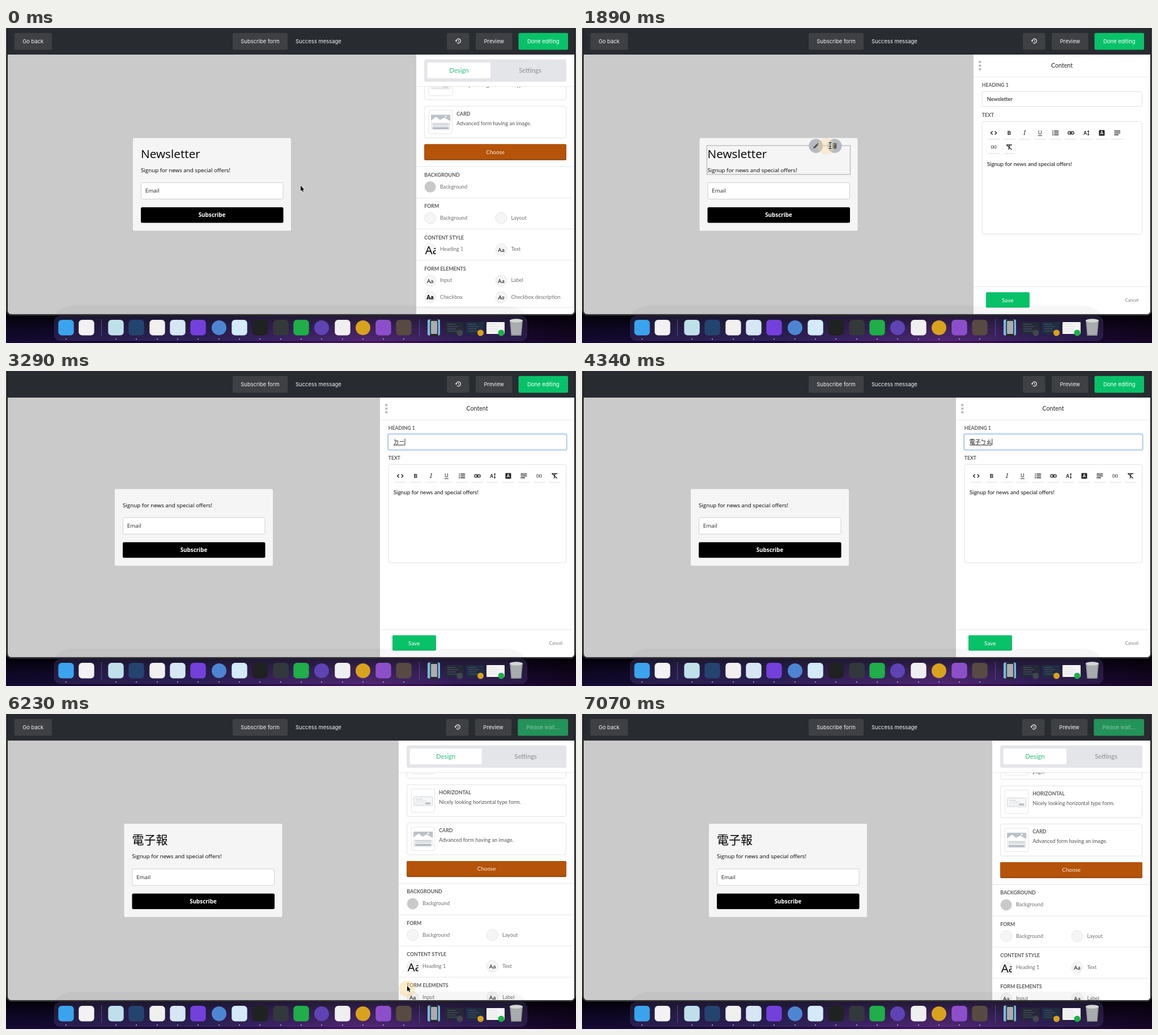
Write an HTML page with a canvas that moves like this. It is 1006 px wide and 557 px high and loops after 7.35 s.

```html
<!DOCTYPE html>
<html lang="en">
<head>
<meta charset="utf-8">
<title>Form editor</title>
<style>
html, body { margin: 0; width: 100%; height: 100%; overflow: hidden; background: #120622; }
canvas { display: block; width: 1006px; height: 557px; }
</style>
</head>
<body>
<canvas id="stage"></canvas>
<script>
const W = 1006, H = 557, LOOP = 7350;
const canvas = document.getElementById('stage');
const dpr = window.devicePixelRatio || 1;
canvas.width = W * dpr;
canvas.height = H * dpr;
const c = canvas.getContext('2d');

const LATO = 'Lato, sans-serif';
const INTER = 'Inter, sans-serif';
const OPEN = '"Open Sans", sans-serif';
const CJK = '"Noto Sans CJK TC", "Noto Sans CJK", sans-serif';
const GREEN = '#08c269';

// Panel swaps: edit panel slides in, design panel slides back
const OPEN_AT = 1747, CLOSE_AT = 6087, SLIDE = 280;

const clamp = v => Math.max(0, Math.min(1, v));
const ease = v => { v = clamp(v); return v * v * (3 - 2 * v); };
const during = (t, a, b) => t >= a && t < b;

function box(x, y, w, h, r, fill, stroke, lw = 1) {
  c.beginPath();
  c.roundRect(x, y, w, h, r);
  if (fill) { c.fillStyle = fill; c.fill(); }
  if (stroke) { c.strokeStyle = stroke; c.lineWidth = lw; c.stroke(); }
}
function disc(x, y, r, fill, stroke) {
  c.beginPath();
  c.arc(x, y, r, 0, 7);
  if (fill) { c.fillStyle = fill; c.fill(); }
  if (stroke) { c.strokeStyle = stroke; c.lineWidth = 1; c.stroke(); }
}
function line(pts, color, lw = 1) {
  c.beginPath();
  for (let i = 0; i < pts.length; i += 2) c.lineTo(pts[i], pts[i + 1]);
  c.strokeStyle = color;
  c.lineWidth = lw;
  c.stroke();
}
function poly(pts, fill, stroke, lw = 1) {
  c.beginPath();
  for (let i = 0; i < pts.length; i += 2) c.lineTo(pts[i], pts[i + 1]);
  c.closePath();
  if (stroke) { c.strokeStyle = stroke; c.lineWidth = lw; c.lineJoin = 'round'; c.stroke(); }
  c.fillStyle = fill;
  c.fill();
}
// y is the middle of the capitals
function text(s, x, y, size, color, font = LATO, style = '', align = 'left') {
  c.font = `${style} ${size}px ${font}`;
  c.textAlign = align;
  c.fillStyle = color;
  c.fillText(s, x, y + size * 0.355);
}
const mid = (s, x, y, size, color, font, style) => text(s, x, y, size, color, font, style, 'center');

function panelLeft(t) {
  return 724 - 64 * (ease((t - OPEN_AT) / SLIDE) - ease((t - CLOSE_AT) / SLIDE));
}

function desktop() {
  const g = c.createLinearGradient(0, 0, W, 0);
  g.addColorStop(0, '#140a33');
  g.addColorStop(0.35, '#1c0c42');
  g.addColorStop(0.64, '#4a1668');
  g.addColorStop(0.8, '#220b42');
  g.addColorStop(1, '#150626');
  c.fillStyle = g;
  c.fillRect(0, 0, W, H);
  // window shadow
  const s = c.createLinearGradient(0, 506, 0, H);
  s.addColorStop(0, 'rgba(0,0,0,0.85)');
  s.addColorStop(0.45, 'rgba(0,0,0,0.4)');
  s.addColorStop(1, 'rgba(0,0,0,0)');
  c.fillStyle = s;
  c.fillRect(0, 0, W, H);
  c.fillStyle = '#2c2c2b';
  c.fillRect(0, 0, 4, 500);
  c.fillRect(1002, 0, 4, 500);
}

function topBar(t) {
  c.fillStyle = '#282b30';
  c.fillRect(3, 0, 1000, 47);
  const saved = t >= CLOSE_AT;
  const btn = (x, w, label, fill = '#3e4043', color = '#f4f4f4') => {
    box(x, 8.7, w, 29.7, 2.5, fill);
    mid(label, x + w / 2, 23.5, 9.45, color, INTER);
  };
  if (t < 1960 || saved) btn(14.5, 66.5, 'Go back');
  btn(400, 97, 'Subscribe form');
  text('Success message', 511, 23.3, 9.45, '#f4f4f4', INTER);
  const d = saved ? 1.2 : 0;
  btn(778 - d, 39.5, '');
  historyIcon(798 - d, 23);
  btn(829 - d, 64.5, 'Preview');
  if (saved) btn(903.3, 88.7, 'Please wait...', '#23935a', '#86c6a4');
  else btn(904.5, 87.5, 'Done editing', GREEN, '#fff');
}
function historyIcon(x, y) {
  c.beginPath();
  c.arc(x + 0.5, y, 3.9, -3, 2.3);
  c.strokeStyle = '#f4f4f4';
  c.lineWidth = 1.2;
  c.stroke();
  poly([x - 5.5, y - 1, x - 1.5, y - 1, x - 3.5, y + 1.5], '#f4f4f4');
  line([x + 0.5, y - 2, x + 0.5, y + 0.4, x + 2.2, y + 1.3], '#f4f4f4');
}

function form(t, L) {
  const cx = (3 + L) / 2, x = cx - 139.5, ix = x + 14;
  const empty = during(t, 3150, 4620), chinese = t >= 4620;
  const h = empty ? 135.5 : chinese ? 165 : 164;
  const top = 276.5 - h / 2, b = top + h;
  box(x, top, 279, h, 2.5, '#f5f5f5');
  if (chinese) text('電子報', ix, top + 29, 21, '#000', CJK);
  else if (!empty) text('Newsletter', ix, top + 28.5, 20.8, '#000', OPEN);
  text('Signup for news and special offers!', ix, b - 107.2, 9.75, '#000', OPEN);
  box(ix + 0.5, b - 85, 250.5, 29, 2, '#fff', '#cfcfcf');
  text('Email', ix + 7.8, b - 70.8, 9.75, '#222', OPEN);
  box(ix, b - 41.6, 251.5, 27.7, 2.5, '#000');
  mid('Subscribe', cx, b - 27.6, 9.85, '#fff', OPEN, 'bold');
  if (during(t, 400, 1960)) hoverTools(x, top);
}
function hoverTools(x, top) {
  box(x + 13, top + 13.3, 253, 51, 0, null, '#b4b6b8', 1.3);
  const y = top + 14, p = x + 205.3, d = x + 238.5;
  disc(p, y, 12.5, '#b5bbc0');
  disc(d, y, 12.5, '#b5bbc0');
  poly([p - 4.5, y + 4.5, p - 4, y + 2, p + 1.5, y - 3.5, p + 3.7, y - 1.3, p - 2, y + 4], '#4a4d50');
  line([p + 2.7, y - 4.5, p + 4.6, y - 2.6], '#4a4d50', 1.5);
  box(d - 3.3, y - 2.4, 6.6, 7.4, 1, '#5a5d60');
  line([d - 4.4, y - 3.6, d + 4.4, y - 3.6], '#5a5d60', 1.3);
  line([d - 1.5, y - 4.8, d + 1.5, y - 4.8], '#5a5d60', 1.2);
}

function thumbHorizontal(x, y) {
  box(x + 4.5, y + 14, 33, 15.5, 1, '#f6f7f8', '#cdd1d5');
  line([x + 8, y + 18, x + 20, y + 18], '#c3c8cd', 1.2);
  line([x + 8, y + 21, x + 27, y + 21], '#d5d9dc', 1);
  box(x + 8, y + 24, 15, 3, 0, '#fff', '#cdd1d5', 0.7);
  box(x + 25, y + 23.7, 9, 3.6, 0.5, '#b6bcc2');
}
function thumbCard(x, y) {
  box(x + 4, y + 8, 34, 27, 1, '#eceef0');
  box(x + 4, y + 8, 34, 14, 1, '#bcc2c8');
  poly([x + 4, y + 22, x + 4, y + 18, x + 13, y + 11.5, x + 20, y + 17, x + 27, y + 13, x + 38, y + 19, x + 38, y + 22], '#fff');
  disc(x + 30, y + 11, 1.5, '#fff');
  line([x + 7, y + 24.3, x + 35, y + 24.3], '#bcc2c8', 1.3);
  line([x + 7, y + 27.5, x + 35, y + 27.5], '#cfd3d7', 1.2);
  box(x + 7, y + 30, 28, 3.2, 0.5, '#b2b9bf');
}

function designPanel(t, L) {
  const x = L + 14.2, w = 989 - x, off = t < OPEN_AT ? -56.5 : L < 712 ? -2 : 0;
  box(x, 55.5, w, 39.5, 3, '#e4e5e9');
  const tab = w / 2 - 14;
  box(x + 5.5, 61, tab, 28, 2.5, '#fff');
  mid('Design', x + 5.5 + tab / 2, 75, 11.3, '#2abf78');
  mid('Settings', 989 - w * 0.255, 75, 11.3, '#8a8c90');
  line([L, 103.5, 1002, 103.5], '#e8e8e8');

  c.save();
  c.beginPath();
  c.rect(L, 104, 1003 - L, 402);
  c.clip();
  c.translate(0, off);
  const option = (y, title, note, thumb) => {
    box(x + 0.5, y, w - 1, 56.5, 3, '#fff', '#e2e2e2');
    box(x + 8, y + 7.5, 41.5, 41.5, 3, '#fff', '#e4e4e4');
    if (thumb) thumb(x + 8, y + 7.5);
    text(title, x + 57, y + 13.7, 8.8, '#5c5c5c', LATO, 'bold');
    text(note, x + 57, y + 30.7, 9.25, '#555');
  };
  option(59, '', '');
  if (off === 0) text('page.', x + 57, 101.5, 9.25, '#555');
  option(127, 'HORIZONTAL', 'Nicely looking horizontal type form.', thumbHorizontal);
  option(194.5, 'CARD', 'Advanced form having an image.', thumbCard);
  box(x, 262, w, 28.3, 2, '#8d4207');
  box(x, 262, w, 26.6, 2, '#b45309');
  mid('Choose', x + w / 2, 276, 9.8, '#fbeee2');

  const col2 = w / 2;
  const heading = (y, s) => {
    line([L, y - 14.5, 1002, y - 14.5], '#e6e6e6');
    text(s, x, y + 0.3, 8.85, '#5a5a5a', LATO, 'bold');
  };
  const item = (dx, y, label, aa, fill = '#f5f5f5') => {
    const ix = x + 10.5 + dx;
    disc(ix, y + 0.5, 10, fill, fill === '#f5f5f5' ? '#e6e6e6' : null);
    if (aa) {
      c.save();
      c.beginPath();
      c.rect(ix - 10, y - 10, 20, 20.5);
      c.clip();
      if (aa === 'big') text('Aa', ix - 9, y + 2, 20.5, '#000', OPEN);
      else mid('Aa', ix, y + 1.3, 9.8, '#000', OPEN, aa);
      c.restore();
    }
    text(label, ix + 17.3, y, 9.2, '#707070');
  };
  heading(316, 'BACKGROUND');
  item(0, 337, 'Background', '', '#c9c9c9');
  heading(371.5, 'FORM');
  item(0, 392.3, 'Background');
  item(col2, 392.3, 'Layout');
  heading(426.7, 'CONTENT STYLE');
  item(0, 447.5, 'Heading 1', 'big');
  item(col2, 447.5, 'Text', 'normal');
  heading(481.8, 'FORM ELEMENTS');
  item(0, 502.7, 'Input', 'normal');
  item(col2, 502.7, 'Label', 'normal');
  item(0, 532, 'Checkbox', 'bold');
  item(col2, 532, 'Checkbox description', 'italic');
  line([L, 551, 1002, 551], '#e6e6e6');
  c.restore();
}

const K = '#222';
const rows = (x, y, a, b) => [-3.2, 0, 3.2].forEach((d, i) => line([x + a, y + d, x + (i === 2 ? b - 3 : b), y + d], K, 1.4));
const tools = [
  (x, y) => {
    line([x - 2, y - 3, x - 5, y, x - 2, y + 3], K, 1.4);
    line([x + 2, y - 3, x + 5, y, x + 2, y + 3], K, 1.4);
  },
  (x, y) => mid('B', x, y, 9.6, K, INTER, 'bold'),
  (x, y) => mid('I', x, y, 10, K, '"Noto Serif", serif', 'italic'),
  (x, y) => { mid('U', x, y - 0.7, 9, K, INTER); line([x - 3.6, y + 4.8, x + 3.6, y + 4.8], K); },
  (x, y) => [-3.3, 0, 3.3].forEach(d => {
    box(x - 5.5, y + d - 0.8, 1.7, 1.7, 0, K);
    line([x - 2.5, y + d, x + 5.5, y + d], K, 1.5);
  }),
  (x, y) => {
    box(x - 5.3, y - 2.4, 5.6, 4.8, 2.4, null, K, 1.2);
    box(x - 0.3, y - 2.4, 5.6, 4.8, 2.4, null, K, 1.2);
    line([x - 2.7, y, x + 2.7, y], K, 1.2);
  },
  (x, y) => {
    mid('A', x - 2, y, 8.6, K, INTER, '600');
    line([x + 3.4, y - 3.5, x + 3.4, y + 3.5], K);
    poly([x + 1.5, y - 2.3, x + 3.4, y - 4.7, x + 5.3, y - 2.3], K);
    poly([x + 1.5, y + 2.3, x + 3.4, y + 4.7, x + 5.3, y + 2.3], K);
  },
  (x, y) => { box(x - 5, y - 5, 10, 10, 1.3, K); mid('A', x, y, 8, '#fff', INTER, '600'); },
  (x, y) => rows(x, y, -5.3, 5.3),
  (x, y) => mid('{x}', x, y, 7.6, K, INTER, '500'),
  (x, y) => {
    line([x - 4, y - 4, x + 5, y - 4], K, 1.4);
    line([x + 1, y - 4, x - 1, y + 4.5], K, 1.4);
    line([x - 5, y - 4.5, x + 4.5, y + 4.5], K, 1.2);
  }
];

// Phonetic typing in the heading field: [from ms, text]
const typed = [
  [0, 'Newsletter'], [3150, ''], [3220, 'ㄉ'], [3290, 'ㄉㄧ'], [3640, 'ㄉㄧㄢ'], [3710, '電'],
  [3850, '電ㄗ'], [3920, '電子'], [4200, '電子ㄅ'], [4270, '電子ㄅㄠ'], [4480, '電子報']
];

function contentPanel(t, L) {
  const x = L + 14.5, w = 989 - x, cx = (L + 1003) / 2;
  [60, 66.5, 73].forEach(y => disc(L + 11.3, y, 2.3, '#bdbdbd'));
  mid('Content', cx, 66.3, 10.7, '#222');
  line([L, 86.5, 1002, 86.5], '#e8e8e8');
  text('HEADING 1', x + 0.3, 101.3, 8.7, '#5c5c5c', LATO, 'bold');

  if (t >= 2870) box(x - 0.3, 111.3, w + 0.9, 28.4, 2.5, '#fff', '#b3cdf8', 2.2);
  else box(x + 0.5, 112.5, w - 1, 26, 2, '#fff', '#e0e0e0');
  const value = typed.filter(k => k[0] <= t).pop()[1];
  const latin = t < 3150;
  const size = latin ? 9.4 : 9.9;
  c.font = `${size}px ${latin ? LATO : CJK}`;
  const tw = c.measureText(value).width;
  if (during(t, 2870, 3150)) box(x + 9.3, 118, tw, 14, 0, '#b4d5fe');
  text(value, x + 9.3, 125.5, size, '#111', latin ? LATO : CJK);
  if (during(t, 3150, 4620)) {
    if (tw) line([x + 9.3, 131, x + 9.3 + tw, 131], '#222', 1);
    line([x + 9.8 + tw, 119.5, x + 9.8 + tw, 131], '#222', 0.9);
  }

  text('TEXT', x + 0.3, 153.8, 8.7, '#5c5c5c', LATO, 'bold');
  const perRow = Math.min(11, Math.floor((w - 15) / 27.2));
  const wrapped = perRow < 11;
  box(x + 0.5, 165.5, w - 1, wrapped ? 199 : 173.5, 2, '#fff', '#e2e2e2');
  tools.forEach((icon, i) => {
    const bx = x + 21.2 + (i % perRow) * 27.25, by = 185.5 + Math.floor(i / perRow) * 25.2;
    box(bx - 11, by - 10.5, 22, 22.2, 2, '#dcdcdc');
    box(bx - 11.5, by - 11.5, 23, 22.3, 2, '#fff');
    icon(bx, by);
  });
  text('Signup for news and special offers!', x + 9.3, wrapped ? 240.2 : 214.8, 9.9, '#111');

  line([L, 457.5, 1002, 457.5], '#e8e8e8');
  box(L + 22, 467.3, 77, 27.2, 2, t >= 5600 ? '#1faa66' : GREEN);
  mid('Save', L + 60.3, 481, 10, '#fff');
  text('Cancel', 958.5, 481, 7.95, '#777');
}

const apps = [
  [106, '#3ba3ee'], [142, '#f3f1f1'], [194, '#bfe0ea'], [230, '#23446f'], [267, '#f0f0ef'],
  [303, '#d6e6f4'], [339, '#7440dc'], [376, '#4c86d2', 1], [412, '#d3eaf8'], [448, '#1f2221'],
  [485, '#33383b'], [521, '#1fae48'], [557, '#5f43b4', 1], [594, '#efefef'], [630, '#d9a21c', 1],
  [666, '#8c4fc9'], [702, '#584a41']
];
// soft edge of the dock reaching over the window
function dockEdge() {
  box(78, 491, 847, 40, [40, 40, 0, 0], 'rgba(0,0,0,0.035)');
}
function dock() {
  box(85.5, 509.5, 834, 43, 10, 'rgba(120,110,190,0.2)', 'rgba(170,150,220,0.18)', 0.8);
  line([168.5, 515, 168.5, 546], '#57488a');
  line([729.5, 515, 729.5, 546], '#57488a');
  apps.forEach(([x, color, round]) => {
    if (round) disc(x, 530, 13, color);
    else box(x - 13.7, 516, 27.4, 27.6, 6, color);
    if (x !== 142) disc(x, 550, 1.1, '#b9b0d0');
  });
  box(744, 515.5, 22, 28, 2, '#79b9dc');
  box(748.5, 515, 14, 30, 2.5, '#23272c');
  box(750, 518, 11, 23, 1, '#a9adb0');
  const mini = (x, fill, badge) => {
    const pale = fill === '#f5f6f5';
    box(x - 16, 520, 32, 21, 1, fill);
    for (let i = 0; i < 4; i++) {
      line([x - 12, 524 + i * 4, x + 2 + (i * 5) % 9, 524 + i * 4], pale ? '#d5dad6' : '#59606e', 0.9);
    }
    disc(x + 10, 539, 5.5, badge);
  };
  mini(791, '#252a36', '#42464d');
  mini(827.5, '#1f2d42', '#d9a21c');
  mini(864, '#f5f6f5', '#1fae48');
  poly([889, 517, 912, 517, 909.5, 544, 891.5, 544], '#8f9395');
  poly([891, 520, 910, 520, 908.5, 542, 892.5, 542], '#a9acad');
  c.beginPath();
  c.ellipse(900.5, 517.5, 11.7, 3.3, 0, 0, 7);
  c.fillStyle = '#d4d6d6';
  c.fill();
}

// Pointer path: [ms, x, y, shape from here on]
const path = [
  [0, 520, 283, 'arrow'], [70, 520, 283, 'arrow'], [420, 420, 250, 'beam'], [770, 358, 236, 'beam'],
  [980, 414, 241, 'beam'], [1120, 414, 241, 'beam'], [1450, 429, 208, 'hand'], [1750, 431, 208, 'beam'],
  [1890, 438, 208, 'beam'], [2000, 490, 195, 'arrow'], [2480, 735, 130, 'beam'], [2660, 763, 127, 'beam'],
  [3150, 763, 127, ''], [5110, 763, 127, 'beam'], [5320, 752, 240, 'beam'], [5460, 745, 290, 'arrow'],
  [5600, 708, 478, 'hand'], [5670, 699, 491, 'hand'], [5880, 706, 487, 'hand'], [6090, 708, 485, 'arrow'],
  [6440, 708, 485, 'arrow'], [6860, 690, -20, ''], [LOOP, 690, -20, '']
];
function click(t, start, x, y) {
  const a = clamp((t - start) / 70) * clamp((start + 420 - t) / 100);
  if (a > 0) disc(x, y, 14.5, `rgba(252,214,140,${0.45 * a})`);
}
function pointer(t) {
  click(t, 1540, 431, 209);
  click(t, 2720, 763, 127);
  click(t, 5950, 708, 486);
  const i = path.findIndex(k => k[0] > t) - 1;
  const [t0, x0, y0, shape] = path[i], [t1, x1, y1] = path[i + 1];
  if (!shape) return;
  const p = (t - t0) / (t1 - t0);
  c.save();
  c.translate(x0 + (x1 - x0) * p, y0 + (y1 - y0) * p);
  if (shape === 'arrow') {
    poly([0, -4.5, 0, 5.5, 2.2, 3.5, 3.8, 6.8, 5.2, 6.1, 3.7, 3, 6.2, 2.8], '#000', '#fff', 1.4);
  } else if (shape === 'beam') {
    for (const [color, lw] of [['#fff', 2.6], ['#111', 1.1]]) {
      line([-2.8, -5.5, -1, -5.5, 0, -4.5, 1, -5.5, 2.8, -5.5], color, lw);
      line([0, -4.5, 0, 4.5], color, lw);
      line([-2.8, 5.5, -1, 5.5, 0, 4.5, 1, 5.5, 2.8, 5.5], color, lw);
      line([-1.3, 1.5, 1.3, 1.5], color, lw * 0.8);
    }
  } else {
    poly([-1.5, 0, 0, -0.8, 1, 0.5, 1.2, 4, 5, 5, 6, 6.5, 5.3, 9, 4.3, 11, -0.7, 11, -4, 7, -3.5, 5.6, -1.2, 6.8], '#fff', '#111', 1.8);
  }
  c.restore();
}

function draw(t) {
  c.setTransform(dpr, 0, 0, dpr, 0, 0);
  const L = panelLeft(t);
  desktop();
  box(1, -10, 1004, 517.5, 8, '#151518', '#5d5d60', 1);
  c.save();
  c.beginPath();
  c.roundRect(3, -10, 1000, 516, 6);
  c.clip();
  c.fillStyle = '#cacaca';
  c.fillRect(3, 47, 1000, 460);
  topBar(t);
  form(t, L);
  c.fillStyle = '#fff';
  c.fillRect(L, 47, 1003 - L, 460);
  if (during(t, OPEN_AT, CLOSE_AT)) contentPanel(t, L);
  else designPanel(t, L);
  dockEdge();
  c.restore();
  dock();
  pointer(t);
}

const begin = performance.now();
function tick() {
  // the picture advances in 70 ms steps
  const t = (performance.now() - begin) % LOOP;
  draw(Math.floor(t / 70) * 70);
  requestAnimationFrame(tick);
}
tick();
</script>
</body>
</html>
```
